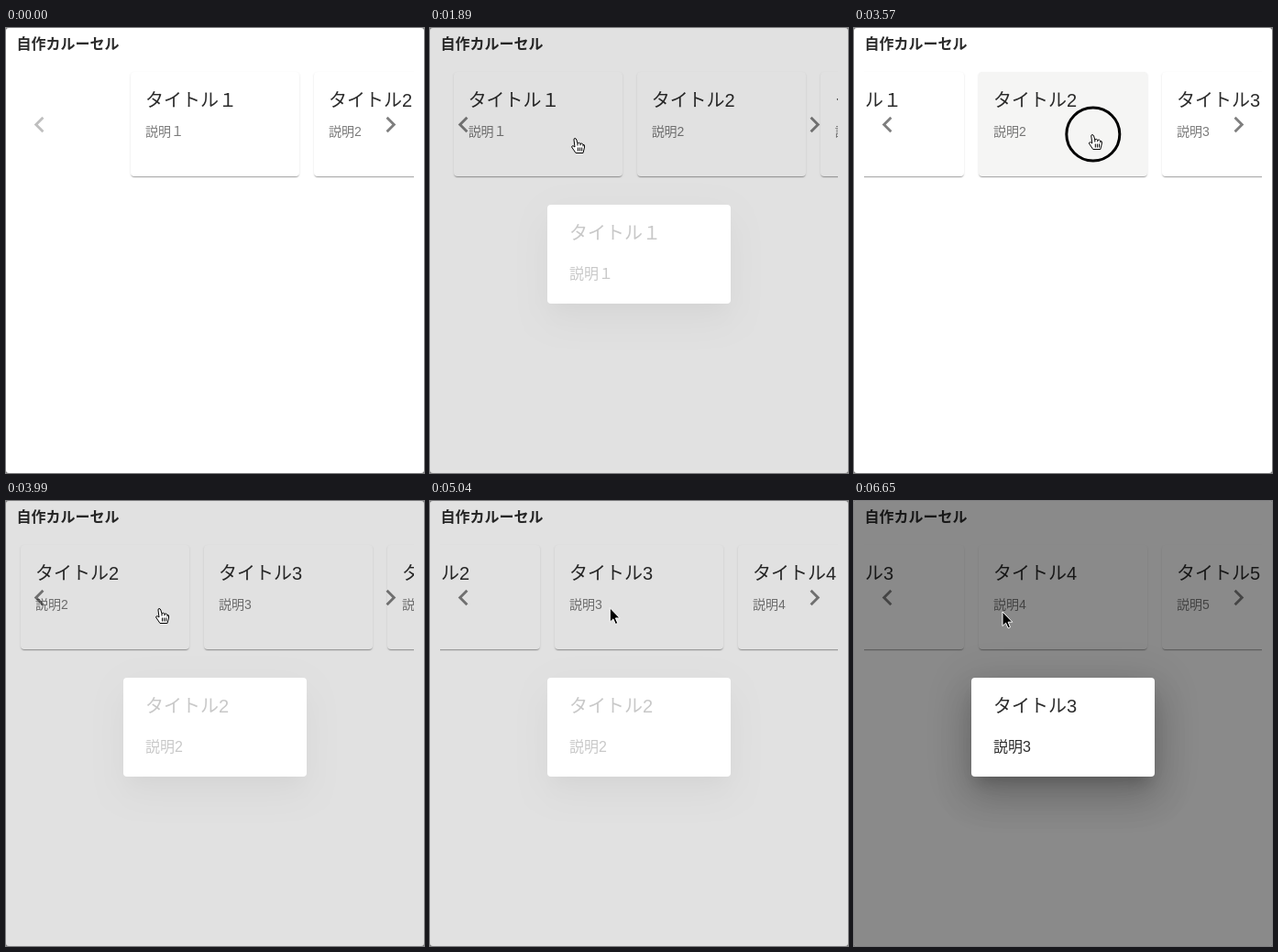
Animation, 456 px wide and 486 px high, one loop 6.72 s. Source, as an HTML page:

```html
<!DOCTYPE html>
<html lang="ja">
<head>
<meta charset="utf-8">
<title>自作カルーセル</title>
<style>
html, body { margin: 0; width: 100%; height: 100%; overflow: hidden; background: #777; }
body { font-family: "Liberation Sans", "Noto Sans CJK JP", "Noto Sans CJK", sans-serif; line-height: 1; color: rgba(0,0,0,.83); }
div, p, svg { position: absolute; margin: 0; white-space: nowrap; }
#stage { left: 0; top: 0; width: 456px; height: 486px; background: #fff; border-radius: 3px; overflow: hidden; }
#head { left: 11.5px; top: 9.5px; font-size: 16px; font-weight: bold; }
#view { left: 11px; top: 40px; width: 434px; height: 130px; overflow: hidden; }
.card { top: 8px; width: 184px; height: 114px; border-radius: 4px; background: #fff;
  box-shadow: 0 2px 1px -1px rgba(0,0,0,.2), 0 1px 1px rgba(0,0,0,.14), 0 1px 3px rgba(0,0,0,.08); }
.card.hover { background: #f5f5f4; }
.title { left: 16px; top: 21px; font-size: 20px; }
.note { left: 16px; top: 58px; font-size: 14px; color: rgba(0,0,0,.52); }
.nav { top: 87.5px; width: 35px; height: 35px; fill: rgba(0,0,0,.5); }
#modal { inset: 0; background: rgba(0,0,0,.46); }
#box { left: 128px; top: 193px; width: 200px; height: 108px; border-radius: 4px; background: #fff;
  box-shadow: 0 11px 15px -7px rgba(0,0,0,.2), 0 24px 38px 3px rgba(0,0,0,.14), 0 9px 46px 8px rgba(0,0,0,.12); }
#box .title { left: 24px; }
#box .note { left: 24px; top: 67.5px; font-size: 16px; color: inherit; }
#pointer { left: 0; top: 0; overflow: visible; }
</style>
</head>
<body>
<div id="stage">
  <p id="head">自作カルーセル</p>
  <div id="view"></div>
  <svg class="nav" id="prev" style="left:18.7px" viewBox="0 0 24 24"><path d="M15.4 7.4 14 6l-6 6 6 6 1.4-1.4L10.8 12z"/></svg>
  <svg class="nav" style="left:402px" viewBox="0 0 24 24"><path d="M10 6 8.6 7.4 13.2 12l-4.6 4.6L10 18l6-6z"/></svg>
  <div id="modal"><div id="box"><p class="title"></p><p class="note"></p></div></div>
  <svg id="pointer" width="1" height="1">
    <path id="arrow" d="M0 0V15.5L3.6 12.2 6.1 17.8 8.5 16.8 6.1 11.2H10.8Z" stroke="#fff" stroke-linejoin="round"/>
    <g id="hand" fill="#fff" stroke="#000" stroke-linejoin="round">
      <path d="M-2 2Q-2 .5-1 .5.3.5.8 2L2 6Q3.5 4.5 5 6.3 7 5.5 8 7.3 10 7 9.6 10L8 16.5H0L-4.4 10Q-4 7.5-1 10Z"/>
      <path d="M2.5 10.5v4M4.6 10.5v4M6.7 10.5v4M2 6v2.5M5 6.3v2M8 7.3v2"/>
    </g>
    <circle id="ring" r="29" fill="none" stroke="#000" stroke-width="3"/>
  </svg>
</div>
<script>
const $ = id => document.getElementById(id);
const LOOP = 6720, STEP = 70, PITCH = 200, FADE = 210, ENTER = 210, REST = 450, GLIDE = 350, DEAD = 4;

// Each swipe drags from `from` to `to`; the pointer then wanders to `exit`, where a click closes the dialog
const swipes = [
  { press: 1330, drag: 1460, release: 1820, close: 2800, from: [242, 122], to: [159, 120], exit: [218, 114] },
  { press: 3360, drag: 3500, release: 3920, close: 4900, from: [264, 116], to: [168, 117], exit: [178, 116] },
  { press: 5460, drag: 5670, release: 6160, close: LOOP, from: [230, 118], to: [162, 121], exit: [162, 121] }
];

const clamp = v => Math.min(1, Math.max(0, v));
const ease = v => (v = clamp(v), v * v * (3 - 2 * v));
const part = (t, a, b) => clamp((t - a) / (b - a));
const within = (t, a, b) => t >= a && t < b;
const show = (el, on) => el.style.display = on ? '' : 'none';
const label = n => n === 1 ? '１' : n;
const mix = (a, b, k) => a.map((v, i) => v + (b[i] - v) * k);
const dragAt = (s, t) => mix(s.from, s.to, part(t, s.drag, s.release) ** 1.9);

function pointerAt(t) {
  const [first] = swipes;
  if (t < first.press) {
    const k = part(t, ENTER, 1050), bow = Math.sin(Math.PI * k);
    return [mix([236], first.from, k)[0] - 32 * bow, 122 + 244 * (1 - k) ** 3 - 15 * bow];
  }
  const i = swipes.findLastIndex((s, n) => !n || t >= swipes[n - 1].close);
  const s = swipes[i];
  if (t < s.drag) return mix(i ? swipes[i - 1].exit : s.from, s.from, i ? ease(part(t, swipes[i - 1].close, swipes[i - 1].close + GLIDE)) : 1);
  if (t < s.release + REST) return dragAt(s, t);
  const k = part(t, s.release + REST, s.close - STEP);
  const [x, y] = mix(s.to, s.exit, ease(k));
  return [x, y - (s.exit[0] - s.to[0]) * .35 * Math.sin(Math.PI * k)];
}

// Distance one swipe has moved the row, snapping to a full card after release
function swiped(s, t) {
  const pull = Math.max(0, s.from[0] - dragAt(s, t)[0] - DEAD);
  return pull + (PITCH - pull) * ease((t - s.release) / FADE);
}

const cards = [1, 2, 3, 4, 5].map(n => {
  const card = document.createElement('div');
  card.innerHTML = `<p class="title">タイトル${label(n)}</p><p class="note">説明${label(n)}</p>`;
  $('view').append(card);
  return card;
});
const [boxTitle, boxNote] = $('box').children;

function draw(t) {
  const scroll = swipes.reduce((sum, s) => sum + swiped(s, t), 0);
  cards.forEach((card, i) => {
    const s = swipes[i];
    card.style.left = 125 + i * PITCH - scroll + 'px';
    card.className = s && within(t, s.drag + STEP, s.release) ? 'card hover' : 'card';
  });
  $('prev').style.fill = t < swipes[0].release ? 'rgba(0,0,0,.25)' : '';

  const open = swipes.findIndex(s => within(t, s.release, s.close + FADE));
  show($('modal'), open >= 0);
  if (open >= 0) {
    const s = swipes[open];
    $('modal').style.opacity = ease((t - s.release) / FADE) * (1 - ease((t - s.close) / FADE));
    boxTitle.textContent = 'タイトル' + label(open + 1);
    boxNote.textContent = '説明' + label(open + 1);
  }

  const [x, y] = pointerAt(t);
  const hand = swipes.some(s => within(t, s.press - 2 * STEP, s.release + REST));
  $('pointer').style.transform = `translate(${x}px, ${y}px)`;
  show($('pointer'), t >= ENTER);
  show($('hand'), hand);
  show($('arrow'), !hand);
  show($('ring'), swipes.some(s => within(t, s.press, s.release)));
}

const start = performance.now();
function tick() {
  const t = (performance.now() - start) % LOOP;
  draw(Math.floor(t / STEP) * STEP);
  requestAnimationFrame(tick);
}
tick();
</script>
</body>
</html>
```
